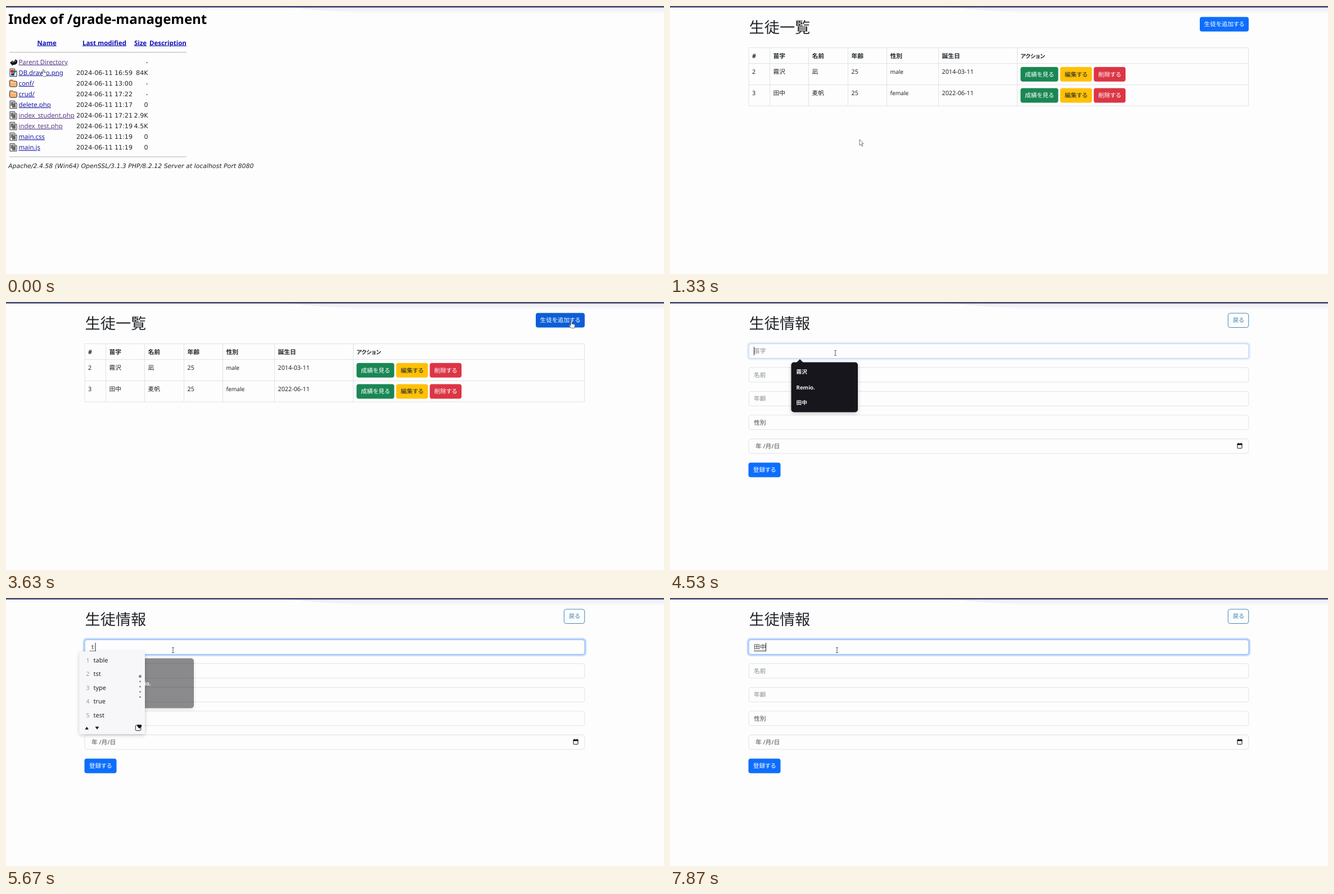
Recreate the animation shown at these times as an HTML page. Size 1170 by 478 pixels, loop 8 s.

```html
<!DOCTYPE html>
<html lang="ja">
<head>
<meta charset="utf-8">
<style>
html, body { margin: 0; width: 100%; height: 100%; overflow: hidden; background: #fdfdfd; }
svg { display: block; width: 1170px; height: 478px; }
text { font-family: "Noto Sans", "Noto Sans CJK JP", "Noto Sans CJK", sans-serif; white-space: pre; fill: #212529;
  text-rendering: geometricPrecision; font-feature-settings: "palt"; }
.wide { font-family: "DejaVu Sans", sans-serif; }
.link { text-decoration: underline; }
</style>
</head>
<body>
<svg id="stage" viewBox="0 0 1170 478"></svg>
<script>
const text = (x, y, str, size, attrs = '') =>
  `<text x="${x}" y="${y}" font-size="${size}" ${attrs}>${str}</text>`;
const rect = (x, y, w, h, fill, attrs = '') =>
  `<rect x="${x}" y="${y}" width="${w}" height="${h}" fill="${fill}" ${attrs}/>`;
const path = (d, fill, attrs = '') => `<path d="${d}" fill="${fill}" ${attrs}/>`;
const group = (id, body) => `<g id="${id}">${body}</g>`;
const fill = color => `style="fill:${color}"`;

const button = (x, y, w, label, color, ink = '#fff', attrs = '') =>
  rect(x, y, w, 26, color, `rx="4" ${attrs}`) +
  text(x + w / 2, y + 16.9, label, 10.7, `text-anchor="middle" ${fill(ink)}`);

// Directory listing
const icons = {
  back: path('M7 101l5-4v2c3 0 4-1 4-4l4 2v3c0 4-4 5-8 5v2z', '#151515') +
        path('M9 100l7-3 3 1-6 3z', '#666'),
  image: path('M7 112h8l4 4v9.500H7z', '#fff', 'stroke="#222"') +
         '<circle cx="11" cy="116.500" r="3" fill="#d22"/>' +
         path('M12 114l6 3-4 5z', '#268a58') + rect(9, 120, 6, 4, '#248') + path('M15 112v4h4', '#fff', 'stroke="#222"'),
  folder: path('M6.500 134q0-2 2-2h3l2 2h4q2 0 2 2v6q0 2-2 2h-9q-2 0-2-2z', '#f5b271', 'stroke="#3a2a1c"') +
          path('M8 136.500h10', 'none', 'stroke="#ffdcb0"'),
  page: path('M7 169h8l4 4v9.500H7z', '#f4f4f4', 'stroke="#333"') +
        rect(8.500, 171, 5, 7, '#777') + rect(11, 174, 6, 7, '#666') + path('M15 169v4h4', '#fff', 'stroke="#333"')
};
const iconY = { back: 100, image: 119, folder: 138, page: 176 };
const files = [
  ['back', 'Parent Directory', '', '-', true],
  ['image', 'DB.drawio.png', '16:59', '84K'],
  ['folder', 'conf/', '13:00', '-'],
  ['folder', 'crud/', '17:22', '-'],
  ['page', 'delete.php', '11:17', '0'],
  ['page', 'index_student.php', '17:21', '2.9K', true],
  ['page', 'index_test.php', '17:19', '4.5K', true],
  ['page', 'main.css', '11:19', '0'],
  ['page', 'main.js', '11:19', '0']
];
const heads = [[55.5, 'Name'], [136, 'Last modified'], [228, 'Size'], [255, 'Description']];
const listing = text(4, 32, 'Index of /grade-management', 24, `font-weight="700" ${fill('#000')}`) +
  heads.map(([x, s]) => text(x, 69.5, s, 11.45, `class="link" font-weight="700" ${fill('#1111b5')}`)).join('') +
  rect(6, 82, 315, 1, '#b4b4b4') + rect(6, 268.5, 315, 1, '#b4b4b4') +
  files.map(([icon, name, time, size, visited], i) => {
    const y = 100 + i * 19.05;
    return `<g transform="translate(0 ${y - iconY[icon]})">${icons[icon]}</g>` +
      text(22.5, y + 3.7, name, 11.36, `class="link" ${fill(visited ? '#5b3a8c' : '#1c1ca6')}`) +
      (time && text(125, y + 3.7, '2024-06-11 ' + time, 11.1, 'class="wide"')) +
      text(252.5, y + 3.7, size, 11.1, 'class="wide" text-anchor="end"');
  }).join('') +
  text(4, 289, 'Apache/2.4.58 (Win64) OpenSSL/3.1.3 PHP/8.2.12 Server at localhost Port 8080', 10.95,
    'class="wide" font-style="italic"');

// Student table
const title = s => text(140.5, 47.5, s, 27.2, 'font-weight="500"');
const columns = [140, 177.5, 246.5, 316.5, 385.5, 477.5, 617.5, 1028.5];
const tableHead = ['#', '苗字', '名前', '年齢', '性別', '誕生日', 'アクション'];
const students = [
  ['2', '霧沢', '凪', '25', 'male', '2014-03-11'],
  ['3', '田中', '麦帆', '25', 'female', '2022-06-11']
];
const cells = (row, y, attrs = '') => row.map((s, i) =>
  text(columns[i] + 6, y, s, i == 6 ? 9.8 : i == 4 && s.length > 2 ? 10.2 : 10.8, attrs)).join('');
const table =
  title('生徒一覧') + button(942, 19.5, 87, '生徒を追加する', '#0d6efd', '#fff', 'id="add"') +
  path([74.5, 102.5, 140.5, 178].map(y => `M140 ${y}H1028.500`).join('') +
    columns.map(x => `M${x} 74.500V178`).join(''), 'none', 'stroke="#dee2e6"') +
  cells(tableHead, 92.7, 'font-weight="700"') +
  students.map((row, i) => {
    const y = 108.7 + i * 37.7;
    return cells(row, y + 12.2) +
      button(623.3, y, 67, '成績を見る', '#198754') +
      button(693.8, y, 56.5, '編集する', '#ffc107', '#212529') +
      button(753.5, y, 56.5, '削除する', '#dc3545');
  }).join('');

// Student form
const fieldY = i => 74.5 + i * 42.4;
const field = (i, label, color, x = 149) =>
  rect(140, fieldY(i), 889, 26, '#fdfdfd', 'rx="4" stroke="#dee2e6"') +
  (label && text(x, fieldY(i) + 16.8, label, 10.8, fill(color)));
const form =
  title('生徒情報') +
  rect(992.3, 20, 36.5, 25.5, '#fdfdfd', 'rx="4" stroke="#4286b4"') +
  text(1010.7, 36.4, '戻る', 10.5, `text-anchor="middle" ${fill('#4286b4')}`) +
  field(0, '', '') + field(1, '名前', '#858a8e') + field(2, '年齢', '#858a8e') +
  field(3, '性別', '#44484c') + field(4, '年 /月/日', '#44484c', 152) +
  rect(1009, 253, 8, 8, 'none', 'rx="1" stroke="#111"') + rect(1008.5, 252.5, 9, 2.7, '#111') +
  path('M1010.500 251v2M1015.500 251v2', 'none', 'stroke="#111"') +
  button(139.5, 286.5, 57, '登録する', '#0d6efd') +
  group('ring',
    rect(138.2, 72.8, 892.5, 29.4, 'none', 'rx="5" stroke="#0d6efd" stroke-opacity=".25" stroke-width="3"') +
    rect(140, 74.5, 889, 26, 'none', 'rx="4" stroke="#86b7fe"')) +
  text(149, 91.3, '', 10.8, 'id="entry"') +
  path('', 'none', 'id="underline" stroke="#333"') +
  rect(0, 80, 1, 15, '#222', 'id="caret"');

const autofill =
  rect(215.5, 107.5, 118.5, 89, '#16181c', 'rx="5" filter="url(#shadow)"') +
  path('M225 108l6-6 6 6z', '#16181c') +
  ['霧沢', 'Remio.', '田中'].map((s, i) =>
    text(224.5, 128.2 + i * 27.3, s, 9.7, `font-weight="700" ${fill('#eee')}`)).join('');

const rowIndex = [0, 1, 2, 3, 4];
const suggestions =
  rect(130.5, 95.5, 116.5, 147, '#f7f7f9', 'rx="4" filter="url(#shadow)"') +
  rowIndex.map(i => text(142.5, 115 + i * 24.4, i + 1, 10.5, fill('#999')) +
    text(155.5, 115 + i * 24.4, '', 11, `id="word${i}"`) +
    `<circle cx="238.500" cy="${139.7 + i * 9.2}" r="${i ? 1.5 : 2.5}" fill="#858585"/>`).join('') +
  path('M140.500 234.500l3.200-5 3.200 5zM158.500 229.500h7l-3.500 5z', '#1a1a1a') +
  rect(230.3, 226.8, 9.5, 9.7, 'none', 'rx="2" stroke="#222"') +
  path('M237.300 233l-3.800-4c-1-3 2.500-4.500 3.800-2 1.300-2.500 4.800-1 3.800 2z', '#111');

const pointers =
  group('arrow', path('M0 0v10.500l2.500-2.200 1.800 3.900 1.600-.7-1.800-3.800H7z', '#fff', 'stroke="#666" stroke-width=".9"')) +
  group('hand', path('M-.8 6V1q0-1 1-1t1 1v4l4.500 1q1 .3.800 1.500l-.8 5H0L-3.500 8q.2-2 2.700 0z', '#fff',
    'stroke="#666" stroke-width=".9"')) +
  group('beam', path('M-2-4.500h1.500l.5.500.5-.5H2M0-4v8M-2 4.500h1.500L0 4l.5.500H2', 'none', 'stroke="#555"'));

stage.innerHTML =
  `<defs><filter id="shadow" x="-20%" y="-20%" width="140%" height="140%">
    <feDropShadow dx="0" dy="2" stdDeviation="3" flood-opacity=".22"/></filter>
  <linearGradient id="haze" x2="0" y2="1"><stop stop-color="#e9e9f2"/><stop offset="1" stop-color="#fdfdfd"/></linearGradient></defs>` +
  path('M490 2H1170V14H640Z', 'url(#haze)') + rect(0, 0, 1170, 2.7, '#474b74') +
  group('listing', listing) + group('table', table) + group('form', form) +
  group('autofill', autofill) + group('suggestions', suggestions) + group('pointer', pointers);

const el = Object.fromEntries([...stage.querySelectorAll('[id]')].map(e => [e.id, e]));
const show = (id, visible) => el[id].setAttribute('display', visible ? 'inline' : 'none');
const clamp = v => Math.max(0, Math.min(1, v));

// time, x, y of the pointer's hot spot
const route = [
  [0, 66, 113], [600, 72, 192], [850, 72, 192], [1300, 337, 238], [2370, 337, 238], [3000, 1022, 45],
  [3170, 1016, 40], [3500, 1005, 34], [3650, 1005, 34], [4430, 294, 91], [4600, 294, 91], [4830, 297, 93]
];
// time, composed text, caret x, candidates
const early = ['田中', 'table', 'たい', '対応', '大変'];
const later = ['田中', '棚', 'たな', '棚卸し', '店子'];
const typing = [
  [0, '', 149, []],
  [5600, 't', 158.5, ['table', 'tst', 'type', 'true', 'test']],
  [6130, 'た', 157, early],
  [6470, 'たn', 166, early],
  [6560, 'たな', 168, later],
  [6660, 'たなk', 177, later],
  [6740, 'たなか', 178, ['田中', 'たなか', 'タナカ', '田中さん', '田仲']],
  [6860, '田中', 170, []]
];

function pointerAt(t) {
  const next = route.findIndex(k => k[0] > t);
  if (next < 0) return route[route.length - 1].slice(1);
  const [a, b] = [route[next - 1], route[next]];
  const p = (t - a[0]) / (b[0] - a[0]), ease = p * p * (3 - 2 * p);
  return [1, 2].map(i => a[i] + (b[i] - a[i]) * ease);
}

function draw(t) {
  show('listing', t < 800);
  show('table', t >= 800 && t < 3650);
  show('form', t >= 3650);

  const hover = t >= 3080 && t < 3650;
  el.add.setAttribute('fill', hover ? '#0b5ed7' : '#0d6efd');
  const kind = t < 850 || hover ? 'hand' : t > 4350 ? 'beam' : 'arrow';
  for (const id of ['arrow', 'hand', 'beam']) show(id, id == kind);
  el.pointer.setAttribute('transform', `translate(${pointerAt(t)})`);

  el.ring.setAttribute('opacity', clamp((t - 4470) / 150));
  show('autofill', t >= 4500 && t < 5740);
  el.autofill.setAttribute('opacity', 1 - clamp((t - 5600) / 140));

  const [, composed, caretX, words] = typing.findLast(k => k[0] <= t);
  el.entry.textContent = composed || '苗字';
  el.entry.setAttribute('x', composed == 't' ? 152 : 149);
  el.entry.style.fill = composed ? '#333' : '#858a8e';
  el.underline.setAttribute('d', composed ? `M149 94.500H${caretX + 1}` : '');
  el.underline.setAttribute('stroke-dasharray', words.length ? '2 1' : 'none');
  el.caret.setAttribute('x', caretX);
  show('caret', t >= 4470 && !(t >= 5000 && t < 5430) && !(t >= 7570 && t < 7870));
  show('suggestions', words.length);
  rowIndex.forEach(i => el['word' + i].textContent = words[i] || '');
}

function frame() {
  draw(performance.now() % 8000);
  requestAnimationFrame(frame);
}
frame();
</script>
</body>
</html>
```
